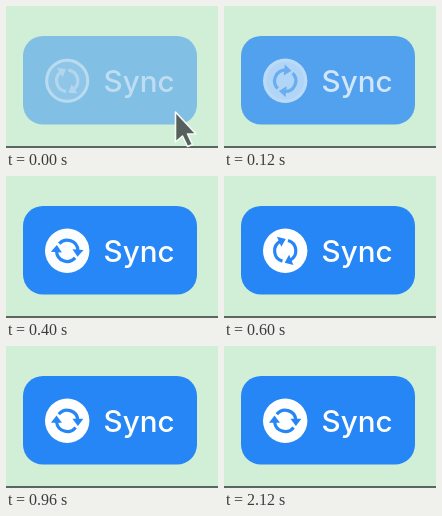
An HTML page for the animation above (2200 ms loop, 212 by 142 pixels).

```html
<!DOCTYPE html>
<html lang="en">
<head>
<meta charset="utf-8">
<title>Sync button</title>
<style>
  html, body { margin: 0; width: 100%; height: 100%; overflow: hidden; background: #d0efd6; }
  svg { display: block; width: 100vw; height: 100vh; }
  text { font: 500 29.6px Inter, "Liberation Sans", sans-serif; fill: #fff; }
</style>
</head>
<body>
<svg id="stage" viewBox="0 0 212 142">
  <defs>
    <g id="half">
      <path d="M-8.4 -6.6A10.7 10.7 0 0 1 10.6 -1" fill="none" stroke="currentColor" stroke-width="3.2"/>
      <path d="M5.2 -2H16.2L10.7 5.2Z" fill="currentColor"/>
    </g>
    <g id="arrows">
      <use href="#half"/>
      <use href="#half" transform="rotate(180)"/>
    </g>
  </defs>
  <rect width="212" height="142" fill="#d0efd6"/>
  <rect y="140" width="212" height="2" fill="#5c6660"/>
  <rect x="17" y="30" width="174" height="88.6" rx="20" fill="currentColor"/>
  <g transform="translate(61.2 74.8)">
    <g id="filled">
      <circle r="22.2" fill="#fff"/>
      <use href="#arrows" class="spin"/>
    </g>
    <g id="outline" color="#fff">
      <circle r="20.5" fill="none" stroke="#fff" stroke-width="3"/>
      <use href="#arrows" class="spin"/>
    </g>
  </g>
  <text id="label" x="97.6" y="86">Sync</text>
  <path id="cursor" d="M169.5 106V136L176.5 130L181.5 140.5L186.5 138.5L181.5 128H190Z"
        fill="#56605c" stroke="#f4faf6" stroke-width="1.6" stroke-linejoin="round"/>
</svg>
<script>
  const LOOP = 2200, STEP = 40, SPIN_END = 960, SPIN_ANGLE = 302;
  const PALE = [208, 239, 214], BLUE = [38, 134, 246];

  // time, button tint, filled icon, outline icon, label
  const FADE = [
    [0, 0.46, 0.10, 0.38, 0.48],
    [80, 0.65, 0.42, 0.20, 0.64],
    [200, 0.93, 0.82, 0.01, 0.93],
    [320, 0.98, 0.96, 0, 0.98],
    [440, 1, 1, 0, 1]
  ];

  const byId = id => document.getElementById(id);
  const stage = byId('stage'), filled = byId('filled'), outline = byId('outline');
  const label = byId('label'), cursor = byId('cursor');
  const spinners = document.querySelectorAll('.spin');
  const mix = (a, b, k) => a + (b - a) * k;

  function fadeAt(t) {
    const next = FADE.findIndex(row => row[0] > t);
    if (next < 0) return FADE[FADE.length - 1];
    const from = FADE[next - 1], to = FADE[next];
    const k = (t - from[0]) / (to[0] - from[0]);
    return from.map((v, i) => mix(v, to[i], k));
  }

  // Steady clockwise spin into the resting pose
  const angleAt = t => -SPIN_ANGLE * Math.max(0, 1 - t / SPIN_END);

  function draw(t) {
    const [, tint, fill, ring, text] = fadeAt(t);
    stage.style.color = `rgb(${PALE.map((v, i) => Math.round(mix(v, BLUE[i], tint)))})`;
    filled.style.opacity = fill;
    outline.style.opacity = ring;
    label.style.opacity = text;
    cursor.style.display = t < STEP ? '' : 'none';
    spinners.forEach(s => s.setAttribute('transform', `rotate(${angleAt(t)})`));
  }

  const start = performance.now();
  function tick() {
    const t = (performance.now() - start) % LOOP;
    draw(Math.floor(t / STEP) * STEP);
    requestAnimationFrame(tick);
  }
  tick();
</script>
</body>
</html>
```
